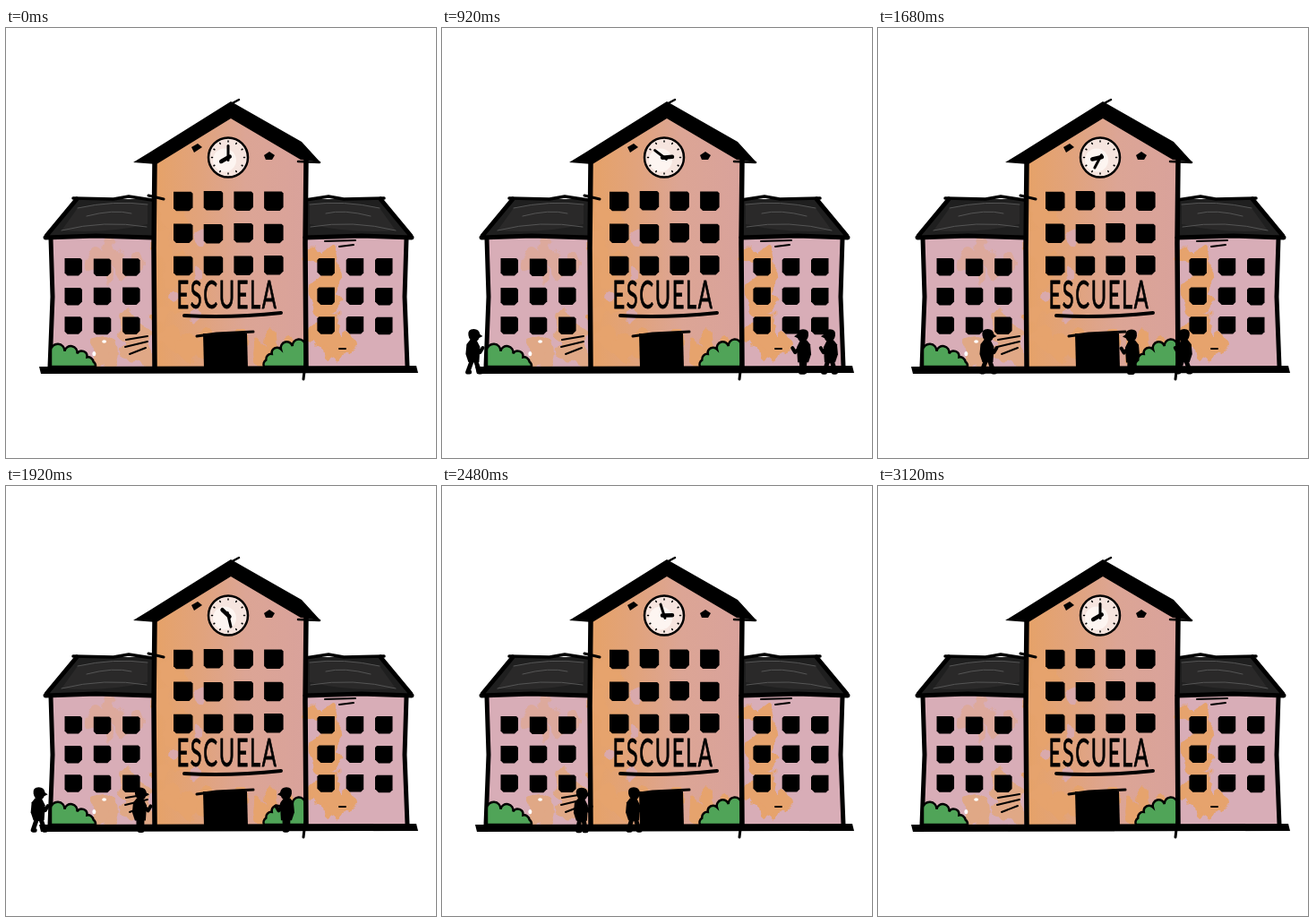
Recreate the animation shown at these times as an HTML page. Size 480 by 480 pixels, loop 3160 ms.

```html
<!DOCTYPE html>
<html lang="es">
<head>
<meta charset="utf-8">
<title>Escuela</title>
<style>
html, body { margin: 0; width: 100%; height: 100%; overflow: hidden; background: #fff; }
svg { display: block; width: 100vw; height: 100vh; }
.ink { fill: none; stroke: #000; stroke-linecap: round; stroke-linejoin: round; }
.sign { font: 43px Lato, "Open Sans", sans-serif; letter-spacing: 3px; stroke: #000; stroke-width: .9; }
</style>
</head>
<body>
<svg id="stage" viewBox="0 0 480 480">
  <defs>
    <filter id="rough" x="-10%" y="-10%" width="120%" height="120%">
      <feTurbulence type="fractalNoise" baseFrequency=".035" numOctaves="3" seed="7"/>
      <feDisplacementMap in="SourceGraphic" scale="24" xChannelSelector="R" yChannelSelector="G"/>
    </filter>
    <clipPath id="walls">
      <path d="M166 148L251 96L335 148V233H447V378H50V233H166Z"/>
    </clipPath>
    <linearGradient id="front">
      <stop offset="0" stop-color="#e6a268"/><stop offset=".3" stop-color="#e1a37c"/>
      <stop offset=".6" stop-color="#dca595"/><stop offset="1" stop-color="#d9a29b"/>
    </linearGradient>
  </defs>

  <g clip-path="url(#walls)">
    <path fill="#d8adb7" d="M40 225H460V385H40Z"/>
    <path fill="url(#front)" d="M166 80H335V380H166Z"/>
    <g id="paint" filter="url(#rough)"></g>
  </g>
  <g id="flecks"></g>
  <g id="wings"></g>

  <!-- tower -->
  <path class="ink" stroke-width="5.5" d="M166 150L165 245L166 378M335 148L334 240L335 378"/>
  <path class="ink" stroke-width="3" d="M334 375L332 392M159 187L176 191"/>
  <path d="M142 150L160 139L251 82L330 127L351 150L329 147L251 101L168 152Z"/>
  <path class="ink" stroke-width="2.5" d="M247 87L260 80M326 149L350 150"/>
  <path d="M207 133L214 129L219 133L210 139ZM288 142L294 138L300 142L297 147L290 147Z"/>
  <g id="windows"></g>
  <text class="sign" transform="translate(190.5 313) scale(.55 1)">ESCUELA</text>
  <path class="ink" stroke-width="4" d="M199 321Q250 324 307 318"/>

  <!-- door, ground and loose strokes -->
  <path d="M220 341H269L270 380H221Z"/>
  <path class="ink" stroke-width="3" d="M213 344L235 341L276 339"/>
  <path class="ink" stroke-width="2" d="M134 348L158 344M133 356L158 350M138 364L156 357M356 238L390 237M372 244L388 242M372 358H379"/>
  <path d="M37 378L458 377L460 385L39 386Z"/>

  <!-- clock -->
  <g transform="translate(248 144.5)">
    <circle r="22" fill="#f6e5df" stroke="#000" stroke-width="2.5"/>
    <circle cx="-4" cy="3" r="13" fill="#fdf5f1"/>
    <g id="ticks" class="ink" stroke-width="1.5"></g>
    <path id="hour" class="ink" stroke-width="4.5" d="M0 2V-9"/>
    <path id="minute" class="ink" stroke-width="3" d="M0 3V-13"/>
  </g>

  <g id="people"></g>
</svg>
<script>
const LOOP = 3160, STEP = 40, DOOR = 246;
const el = id => document.getElementById(id);
const times = (n, f) => Array.from({ length: n }, (_, i) => f(i)).join('');

let seed = 11;
const rnd = () => (seed = seed * 16807 % 2147483647) / 2147483647;

// Scatters n blobs of about radius r over a rectangle
const splash = (color, x, y, w, h, r, n) => times(n, () =>
  `<ellipse cx="${x + rnd() * w}" cy="${y + rnd() * h}" rx="${r * (.5 + rnd() * .5)}" ry="${r * (.5 + rnd())}" fill="${color}"/>`);

const orange = '#e6a36d', salmon = '#dda99c', pink = '#d9a9ac';
el('paint').innerHTML =
  splash(salmon, 95, 245, 60, 40, 13, 8) +
  splash('#e0a886', 100, 330, 55, 40, 13, 9) +
  splash(orange, 345, 250, 20, 110, 13, 16) +
  splash(orange, 345, 345, 50, 25, 13, 7) +
  splash(orange, 172, 170, 30, 190, 13, 12) +
  splash(pink, 180, 230, 40, 120, 8, 5) +
  splash(orange, 200, 350, 120, 20, 13, 9);
el('flecks').innerHTML = splash('#fff', 66, 322, 80, 45, 3, 5);

function grid(x, y, cols, rows, dx, dy, size) {
  const s = size;
  return times(rows, r => times(cols, c =>
    `<path d="M${x + c * dx} ${y + r * dy + rnd()}h${s - 2}l2 2v${s - 6}l-4 4h${7 - s}l-3 -3z"/>`));
}
el('windows').innerHTML = grid(187, 182, 4, 3, 33.7, 36, 21.5);

// Scalloped quarter ellipse growing out of the wall
function bush(x, y, w, h, n = 5) {
  const at = i => [x + w * Math.sin(i / n * Math.PI / 2), y - h * Math.cos(i / n * Math.PI / 2)];
  const arcs = times(n, i => `A6 6 0 0 1 ${at(i + 1)}`);
  return `<path fill="#50a458" stroke="#000" stroke-width="2.5" d="M${x} ${y}L${at(0)}${arcs}Z"/>`;
}

const wing = bushHeight => `
  <path fill="#1f1f1f" d="M79 191H163V232H45Z"/>
  <path fill="#2a2929" d="M80 201Q120 192 158 197V219Q110 230 62 226Z"/>
  <path class="ink" style="stroke:#555" stroke-width="1" d="M80 201Q120 192 158 197M90 210Q120 202 140 207M62 226Q110 214 157 222"/>
  <path class="ink" stroke-width="5" d="M44 234L100 232L163 234M79 191L45 232"/>
  <path class="ink" stroke-width="3.5" d="M75 190L120 191L137 188L163 192"/>
  <path class="ink" stroke-width="5" d="M50 235L52 300L49 378"/>
  ${grid(65.5, 256.5, 3, 3, 32.3, 32.7, 19.5)}
  ${bush(50, 378, 50, bushHeight)}`;
el('wings').innerHTML = wing(18) +
  `<g transform="translate(497 0) scale(-1 1)">${wing(0).replace(/<path fill="#50a458".*$/, '')}</g>` +
  `<g transform="translate(334 0) scale(-1 1)">${bush(0, 378, 46, 24)}</g>`;

el('ticks').innerHTML = times(12, i => `<path d="M0 -17.5v-1" transform="rotate(${i * 30})"/>`);

// Each walker reaches the door at a steady speed (px per ms)
const walkers = [
  { dir: -1, speed: .158, arrive: 1914 },
  { dir: -1, speed: .12, arrive: 2478 },
  { dir: 1, speed: .1145, arrive: 2759 },
  { dir: 1, speed: .213, arrive: 2903 }
];

const body = `
  <path d="M-6 -43Q-7 -50 0 -50Q6 -50 7 -44L10 -42L6 -40Q5 -36 0 -36Q-5 -37 -6 -43Z"/>
  <path d="M-4 -38H3L7 -30L6 -13H-6L-9 -22L-8 -33Z"/>
  <path class="ink arm" stroke-width="4"/>
  <path class="ink legs" stroke-width="5"/>`;

for (const w of walkers) {
  w.node = document.createElementNS('http://www.w3.org/2000/svg', 'g');
  w.node.innerHTML = body;
  el('people').append(w.node);
  w.arm = w.node.querySelector('.arm');
  w.legs = w.node.querySelector('.legs');
}

function walk(w, t) {
  const left = w.speed * (w.arrive - t);
  w.node.style.display = left > 0 ? '' : 'none';
  const x = DOOR - w.dir * left, s = Math.sin(x / 7);
  w.node.setAttribute('transform', `translate(${x} ${387 - Math.abs(s)}) scale(${w.dir} 1)`);
  w.arm.setAttribute('d', `M3 -30L${8 + s} -24L${11 + s} -29`);
  w.legs.setAttribute('d',
    `M-2 -15L${-3 + 2 * s} -7L${-3 + 4 * s} -2h2M2 -15L${3 - 2 * s} -7L${2 - 4 * s} -2h2`);
}

const turn = (id, turns) => el(id).setAttribute('transform', `rotate(${turns % 1 * 360})`);

function draw(now) {
  const t = Math.floor(now % LOOP / STEP) * STEP;
  const p = t / (LOOP - STEP);
  const hours = 8 + 24 * p - .35 * Math.sin(Math.PI * p) ** 2;
  turn('hour', hours / 12);
  turn('minute', hours);
  walkers.forEach(w => walk(w, t));
}

const start = performance.now();
function tick() {
  draw(performance.now() - start);
  requestAnimationFrame(tick);
}
tick();
</script>
</body>
</html>
```
